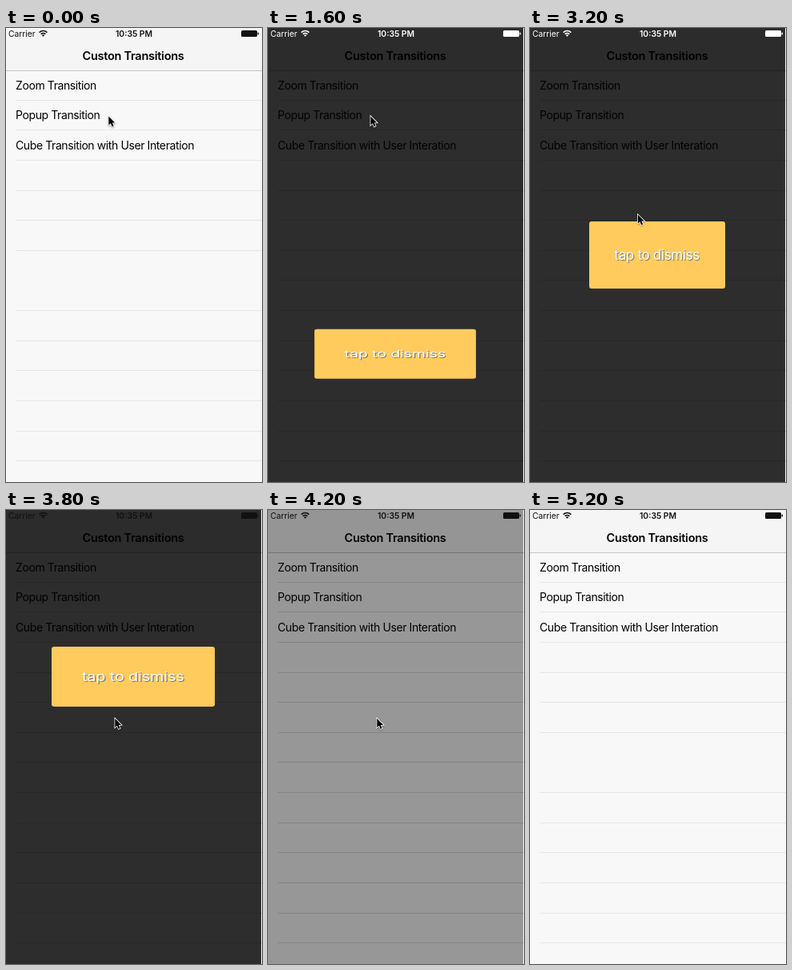
An HTML page with a canvas for the animation above (6000 ms loop, 320 by 568 pixels).

```html
<!DOCTYPE html>
<html lang="en">
<head>
<meta charset="utf-8">
<title>Custon Transitions</title>
<style>
html, body { margin: 0; width: 100%; height: 100%; overflow: hidden; background: #f8f8f8; }
canvas { display: block; }
</style>
</head>
<body>
<canvas id="stage" width="320" height="568"></canvas>
<script>
const ctx = document.getElementById('stage').getContext('2d');
const W = 320, H = 568, LOOP = 6000, STEP = 100;
const FONT = 'Inter, "Liberation Sans", sans-serif';
const ROWS = ['Zoom Transition', 'Popup Transition', 'Cube Transition with User Interation'];
const POPUP = { x: 159, y: 284, w: 170, h: 84 };
const DIM = 0.82;

const clamp = v => Math.min(1, Math.max(0, v));
const ease = v => { v = clamp(v); return v * v * (3 - 2 * v); };
const mix = (a, b, k) => a + (b - a) * k;

function text(str, x, y, size, color, weight = 400, spacing = 0, align = 'left') {
  ctx.font = `${weight} ${size}px ${FONT}`;
  ctx.letterSpacing = spacing + 'px';
  ctx.textAlign = align;
  ctx.fillStyle = color;
  ctx.fillText(str, x, y);
}

function rect(x, y, w, h, color) {
  ctx.fillStyle = color;
  ctx.fillRect(x, y, w, h);
}

function rounded(x, y, w, h, r) {
  ctx.beginPath();
  ctx.roundRect(x, y, w, h, r);
}

function dimAt(t) {
  if (t < 1200) return 0;
  if (t < 3000) return DIM * ease((t - 1085) / 510);
  return DIM * (1 - ease((t - 3892) / 600));
}

// Remaining distance of a slightly underdamped spring, 1 to 0.
function spring(ms) {
  const s = ms * 0.0055, a = 0.484 * s;
  return Math.exp(-s) * (Math.cos(a) + 2.065 * Math.sin(a));
}

function popupAt(t) {
  if (t < 1200 || t > 4100) return null;
  if (t < 3400) {
    const d = spring(t - 1172), k = Math.max(0, d) / 0.2195;
    return {
      y: POPUP.y + H * d,
      sx: 1 + 0.19 * Math.pow(k, 1.8),
      sy: Math.max(0.3, 1 - 0.265 * Math.pow(k, 1.3))
    };
  }
  const k = Math.pow(Math.max(0, t - 3500) / 300, 3);
  const bump = Math.max(0, 1 - Math.abs(t - 3500) / 150);
  return {
    y: POPUP.y - 75.5 * k,
    sx: 1 + 0.2 * k - 0.02 * bump,
    sy: Math.max(0.3, 1 - 0.107 * k + 0.05 * bump)
  };
}

function cursorAt(t) {
  if (t >= 5200) return null;
  if (t < 4500) {
    const k = ease((t - 2800) / 550);
    return [mix(128.3, 136.3, k), mix(110.5, 261, k)];
  }
  if (t < 4900) {
    const k = Math.pow((t - 4500) / 400, 2);
    return [mix(136.3, 182, k), mix(261, 167, k)];
  }
  const k = (t - 4900) / 100;
  return [182 + 58 * k, 167 - 80 * k];
}

function drawList(dim) {
  rect(0, 0, W, H, '#f8f8f8');
  rect(0, 0, W, 53, '#f5f5f5');
  rect(0, 53, W, 1, dim ? '#bcbcbc' : '#c6c6c6');
  text('Custon Transitions', 159, 39.6, 14.5, '#000', 600, -0.26, 'center');
  ROWS.forEach((row, i) => text(row, 12, 76.5 + 37.6 * i, 14, '#000', 400, -0.4));
  for (let i = 0; i < 13; i++) {
    if (i === 6 && !dim) continue;
    rect(12, Math.floor(90.2 + 37.62 * i), W - 12, 1, dim ? '#d8d8d8' : '#e6e6e6');
  }
}

function drawStatus(color) {
  text('Carrier', 3, 10.8, 10.3, color);
  text('10:35 PM', 160, 10.8, 10.3, color, 600, 0, 'center');
  ctx.strokeStyle = color;
  ctx.lineWidth = 1.5;
  for (const r of [4, 6.9]) {
    ctx.beginPath();
    ctx.arc(46.5, 10.5, r, -Math.PI * 0.75, -Math.PI * 0.25);
    ctx.stroke();
  }
  ctx.beginPath();
  ctx.moveTo(46.5, 10.8);
  ctx.arc(46.5, 10.8, 2.5, -Math.PI * 0.75, -Math.PI * 0.25);
  ctx.fill();
  rounded(294, 3, 20, 8, 1.5);
  ctx.fill();
  rounded(314.6, 5.6, 1.3, 3, 0.6);
  ctx.fill();
}

function drawPopup(p) {
  const { w, h } = POPUP;
  ctx.save();
  ctx.beginPath();
  ctx.rect(0, 0, W - 1, H);
  ctx.clip();
  ctx.translate(POPUP.x, p.y);
  ctx.scale(p.sx, p.sy);
  rounded(-w / 2, -h / 2, w, h, 3);
  ctx.fillStyle = '#ffcb5c';
  ctx.fill();
  text('tap to dismiss', 0.7, 7.2, 16.6, '#777', 400, -0.15, 'center');
  text('tap to dismiss', -0.2, 6.2, 16.6, '#fff', 400, -0.15, 'center');
  ctx.restore();
}

function drawCursor([x, y]) {
  ctx.save();
  ctx.translate(x, y);
  ctx.scale(0.92, 0.92);
  ctx.beginPath();
  [[0, 0], [0, 12], [2.8, 9.5], [4.8, 14], [6.8, 13.1], [4.9, 8.8], [8.6, 8.6]]
    .forEach(([px, py]) => ctx.lineTo(px, py));
  ctx.closePath();
  ctx.shadowColor = 'rgba(0,0,0,0.35)';
  ctx.shadowBlur = 2;
  ctx.shadowOffsetY = 1;
  ctx.strokeStyle = '#fff';
  ctx.lineWidth = 1.7;
  ctx.stroke();
  ctx.shadowColor = 'transparent';
  ctx.fillStyle = '#000';
  ctx.fill();
  ctx.restore();
}

function draw(t) {
  const dim = dimAt(t), popup = popupAt(t), cursor = cursorAt(t);
  drawList(dim);
  if (dim) rect(0, 0, W - 1, H, `rgba(0,0,0,${dim})`);
  if (popup) drawPopup(popup);
  drawStatus(t >= 1200 && t < 3500 ? '#fff' : '#111');
  if (cursor) drawCursor(cursor);
}

const start = performance.now();
function tick() {
  const t = (performance.now() - start) % LOOP;
  draw(Math.floor(t / STEP + 0.001) * STEP);
  requestAnimationFrame(tick);
}
tick();
</script>
</body>
</html>
```
